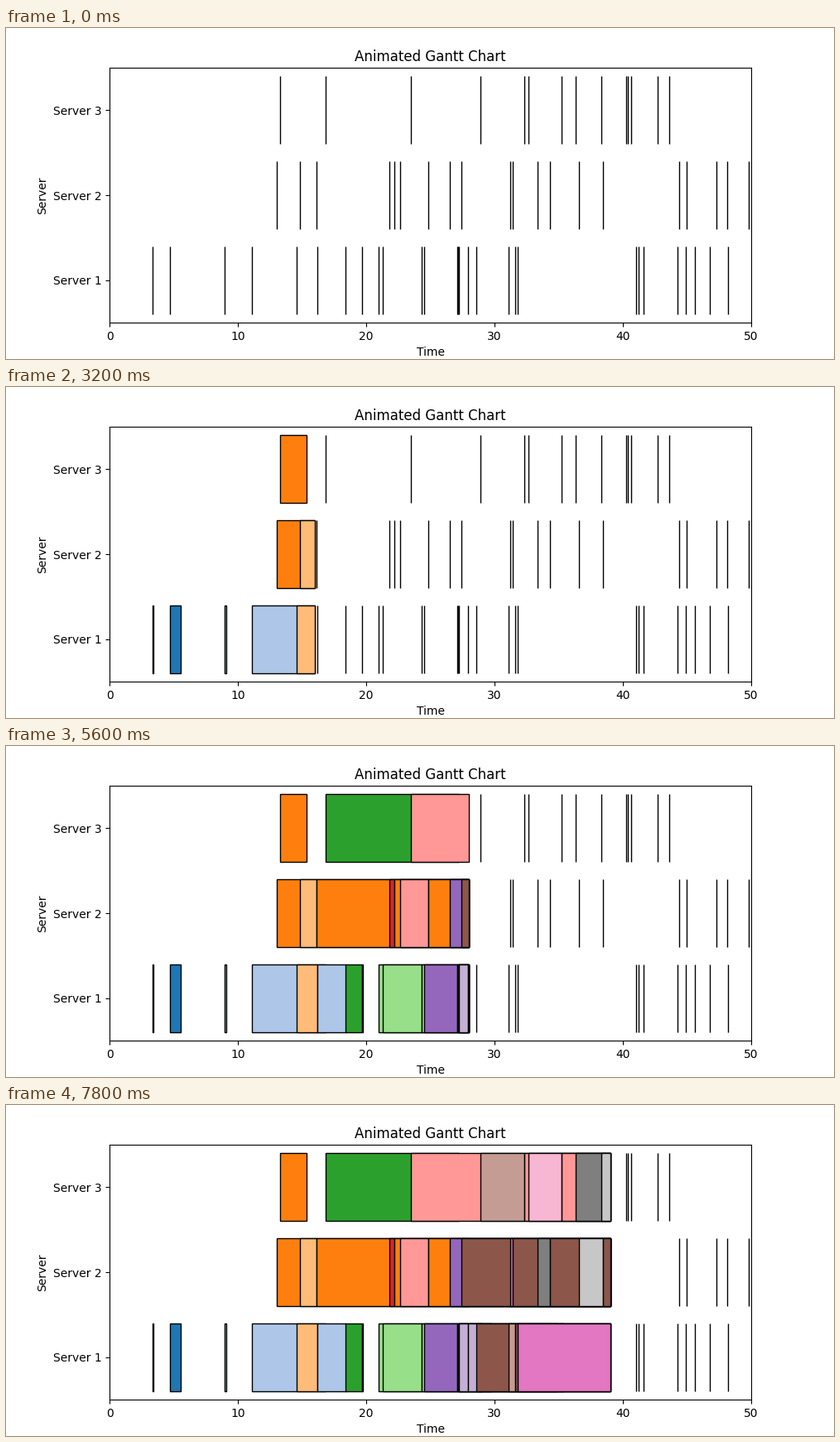
Recreate the animation shown at these times as a matplotlib script. Size 1000 by 400 pixels, loop 8 s.

```python
from math import inf

import matplotlib.pyplot as plt
from matplotlib.animation import FuncAnimation

FRAMES = 40
INTERVAL = 200
HORIZON = 50

# (arrival, service time) of each server's jobs; inf outlasts the chart
QUEUES = [
    [(3.35, 0.07), (4.71, 0.84), (8.97, 0.13), (11.10, 5.75), (14.58, 1.61),
     (18.39, 1.29), (20.97, inf), (21.29, 3.03), (24.52, 2.58), (27.16, 1.87),
     (27.23, 0.71), (28.58, 6.28), (31.10, 0.51), (31.81, 9.22),
     (41.23, 0.38), (44.26, 0.64), (48.19, inf)],
    [(13.03, inf), (14.84, 1.29), (21.81, 0.38), (22.65, 2.19), (26.52, 1.48),
     (27.42, 13.94), (31.23, 0.19), (33.35, 0.97), (36.58, 1.87),
     (47.29, 0.84), (49.81, inf)],
    [(13.29, 2.06), (16.84, 10.38), (23.48, inf), (28.90, 3.42),
     (32.65, 2.58), (36.32, inf), (38.32, 1.94), (40.39, 0.26),
     (42.71, 0.90)],
]


def serve(queue):
    """Newest job first; an interrupted job resumes when the newer one ends.

    Yield (start, planned length, arrival) for every stretch of work.
    """
    waiting = []
    next_arrivals = [arrival for arrival, _ in queue[1:]] + [HORIZON]
    for (arrival, service), cut in zip(queue, next_arrivals):
        waiting.append((arrival, service))
        now = arrival
        while waiting and now < cut:
            job, left = waiting.pop()
            yield now, left, job
            if now + left > cut:
                waiting.append((job, left - (cut - now)))
            now += left


fig, ax = plt.subplots(figsize=(10, 4), dpi=100)
# A hair to the right, so that centred text rounds up to whole pixels
fig.subplots_adjust(left=0.12502, right=0.90002)
ax.set_title("Animated Gantt Chart")
ax.set_xlabel("Time")
ax.set_ylabel("Server")
ax.set_xlim(0, HORIZON)
ax.set_ylim(-0.5, len(QUEUES) - 0.5)
ax.set_yticks(range(len(QUEUES)),
              [f"Server {row + 1}" for row in range(len(QUEUES))])

# Colours follow the order of arrival over all servers
arrivals = sorted(arrival for queue in QUEUES for arrival, _ in queue)
colors = {arrival: plt.cm.tab20(i / len(arrivals))
          for i, arrival in enumerate(arrivals)}

bars = []
for row, queue in enumerate(QUEUES):
    for start, length, job in serve(queue):
        (rect,) = ax.barh(row, 0, left=start, color=colors[job],
                          edgecolor="black")
        bars.append((rect, start, length))


def update(now):
    for rect, start, length in bars:
        rect.set_width(min(max(now - start, 0), length))
    return [rect for rect, _, _ in bars]


anim = FuncAnimation(fig, update, frames=FRAMES, interval=INTERVAL,
                     init_func=lambda: update(0), repeat=True, repeat_delay=0)
plt.show()
```
